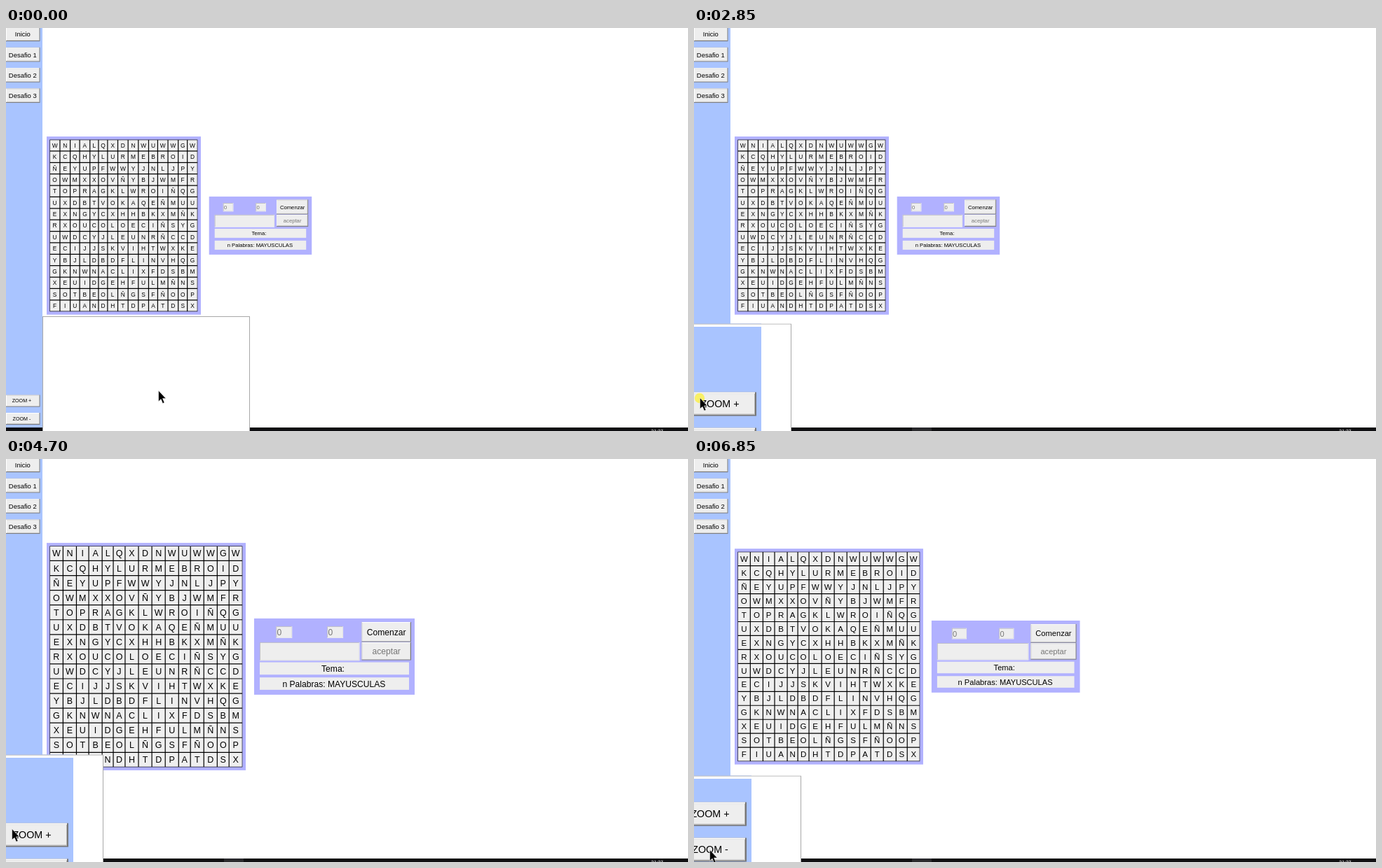
An HTML page for the animation above (8240 ms loop, 973x576 px).

```html
<!DOCTYPE html>
<html lang="es">
<head>
<meta charset="utf-8">
<title>Sopa de letras</title>
<style>
@property --x { syntax: '<number>'; inherits: true; initial-value: 217; }
@property --y { syntax: '<number>'; inherits: true; initial-value: 518; }
html, body { margin: 0; width: 100%; height: 100%; overflow: hidden; background: #fff; }
svg { display: block; width: 973px; height: 576px; font-family: 'Liberation Sans', Arial, sans-serif; }
text { fill: #000; white-space: pre; }
.mid { text-anchor: middle; }
.dim { fill: #777; }
.pointer { transform: translate(calc(var(--x) * 1px), calc(var(--y) * 1px)); }
.zoomed { transform: translate(calc(var(--x) * -2px), calc(var(--y) * -2px)) scale(2); }
</style>
</head>
<body>
<svg id="stage" viewBox="0 0 973 576" xmlns="http://www.w3.org/2000/svg"></svg>
<script>
const LOOP = 8240, STEP = 68.4, MIDDLE = 282.4;
const ROWS = ('WNIALQXDNWUWWGW KCQHYLURMEBROID ÑEYUPFWWYJNLJPY OWMXXOVÑYBJWMFR TOPRAGKLWROIÑQG ' +
  'UXDBTVOKAQEÑMUU EXNGYCXHHBKXMÑK RXOUCOLOECIÑSYG UWDCYJLEUNRÑCCD ECIJJSKVIHTWXKE ' +
  'YBJLDBDFLINVHQG GKNWNACLIXFDSBM XEUIDGEHFULMÑNS SOTBEOLÑGSFÑOOP FIUANDHTDPATDSX').split(' ');
// widest letter of each column sets its share of the grid width
const COLS = 'WWMWNOWWWWOWWOW';
const SHARE = { W: .0694, M: .064, N: .0578, O: .0614 };

// growth of the grid and of the control panel at each zoom level
const LEVELS = [[0, 0], [.27, .39], [.765, .79], [1, 1]];
const CLICKS = [[2850, 3110], [3650, 3970], [4430, 4700], [6510, 6850]];
// pointer legs: start, number of jumps, position reached
const PATH = [
  [740, 13, 22, 512.5], [1630, 2, 14.5, 512.5], [1770, 5, 8, 526],
  [2510, 3, 8, 528.5], [5630, 4, 18.5, 552.5], [5910, 4, 22, 558.5]
];

const mix = (a, b, t) => a + (b - a) * t;
const rect = (x, y, w, h, fill, more = '') =>
  `<rect x="${x}" y="${y}" width="${w}" height="${h}" fill="${fill}" ${more}/>`;
const text = (s, x, cy, size, cls = 'mid') =>
  `<text class="${cls}" x="${x}" y="${cy + size * .36}" font-size="${size}">${s}</text>`;
const group = (cls, body) => `<g class="${cls}">${body}</g>`;

function bevel(x, y, w, h, down) {
  const light = down ? '#777' : '#fff', dark = down ? '#fff' : '#777';
  return rect(x, y, w, h, dark) + rect(x, y, w - 1, h - 1, light) +
    rect(x + 1, y + 1, w - 2, h - 2, down ? '#eee' : '#b4b4b4') +
    rect(x + 1, y + 1, w - 2.5, h - 2.5, '#eee');
}

function sunken(x, y, w, h) {
  return rect(x, y, w, h, '#f8f8f8') + rect(x, y, w - .7, h - .7, '#b4b4c0') +
    rect(x + .8, y + .8, w - 1.5, h - 1.5, '#eee');
}

function zoomButton(sign, down) {
  const y = sign === '+' ? 524.5 : 550, shift = down ? .5 : 0;
  return bevel(0, y, 48.5, 17, down) + text('ZOOM ' + sign, 22.5 + shift, y + 8.4 + shift, 7.15);
}

function sidebar() {
  const labels = ['Inicio', 'Desafio 1', 'Desafio 2', 'Desafio 3'];
  return rect(0, 0, 52, 571, '#a9c4ff') +
    labels.map((s, i) => bevel(0, i * 29.3 - 1.5, 48.5, 20.5) + text(s, 23.8, i * 29.3 + 8.8, 9.45)).join('') +
    zoomButton('+') + zoomButton('-');
}

function board(grow) {
  const half = mix(127.3, 162.5, grow), right = mix(278, 342, grow);
  const left = 62.3, width = right - 4.7 - left;
  const top = MIDDLE - half + 4.5, rowH = (half * 2 - 9) / 15;
  let x = left, cells = '', letters = '';
  [...COLS].forEach((c, i) => {
    const w = SHARE[c] * width;
    ROWS.forEach((row, j) => {
      const y = top + j * rowH;
      cells += `M${x + .6} ${y + .6}h${w - 1.2}v${rowH - 1.2}h${1.2 - w}z`;
      letters += text(row[i], x + w / 2, y + rowH / 2, mix(8.4, 12.5, grow));
    });
    x += w;
  });
  return rect(58, MIDDLE - half, right - 58, half * 2, '#b1b1ff') +
    rect(left, top, x - left, rowH * 15, '#000') + `<path fill="#efefef" d="${cells}"/>` + letters;
}

function controls(grow, wide) {
  const left = mix(289.7, 354, grow), width = mix(146.5, 229, wide), height = mix(83, 109, grow);
  const font = mix(7.7, 12.1, mix(grow, wide, .5));
  const x = left + 8, full = width - 16, line = mix(13, 17.7, grow);
  // rows are stacked upwards from the bottom edge
  const words = MIDDLE + height / 2 - 7 - line, theme = words - 4 - line;
  const acceptH = mix(17, 25.5, grow), accept = theme - 3 - acceptH;
  const startH = mix(21, 28.5, grow), start = accept - .5 - startH;
  const buttonW = width * .308, button = left + width - 5 - buttonW;
  const count = at => {
    const cx = left + width * at, cy = start + startH / 2 + .3;
    return sunken(cx, cy - line * .47, width * .1, line * .94) + text('0', cx + 1.2, cy, font, 'dim');
  };
  return rect(left, MIDDLE - height / 2, width, height, '#b1b1ff') + count(.137) + count(.455) +
    bevel(button, start, buttonW, startH) + text('Comenzar', button + buttonW / 2, start + startH / 2, font) +
    bevel(button, accept, buttonW, acceptH) +
    text('aceptar', button + buttonW / 2, accept + acceptH / 2, font, 'mid dim') +
    sunken(x, accept, button - 3 - x, acceptH + .8) +
    rect(x, theme, full, line, '#eee') + text('Tema:', x + full / 2 - 2, theme + line / 2, font) +
    rect(x, words, full, line, '#eee') +
    text('n Palabras: MAYUSCULAS', x + full / 2 - .6, words + line / 2 + .2, font);
}

const taskbar = rect(0, 571, 973, 5, '#0e0e11') + rect(311, 571, 28, 5, '#29292c') +
  '<text class="mid" x="929" y="579.3" font-size="7" style="fill:#fff">21:27</text>';

const lens = '<clipPath id="glass"><rect x="-165" y="-106" width="296" height="300"/></clipPath>' +
  '<g clip-path="url(#glass)">' + rect(-165, -106, 296, 300, '#fff') +
  group('zoomed', sidebar() + group('press-in', zoomButton('+', true)) +
    group('press-out', zoomButton('-', true))) +
  rect(-162.5, -103.5, 291, 300, 'none', 'stroke="#fff" stroke-width="4"') +
  rect(-164.5, -105.5, 295, 304, 'none', 'stroke="#a8a8a8"') + '</g>';

const cursor = '<circle class="click" cy=".5" r="7.2" fill="#fbf044" opacity=".8"/>' +
  '<path d="M.6 .3v15.5l3.5-3.3 2.5 6 2.4-1-2.5-5.9h4.6z" stroke="#fff" stroke-width=".5"/>';

document.getElementById('stage').innerHTML = rect(0, 0, 973, 576, '#fff') + taskbar + sidebar() +
  LEVELS.map(([grow, wide], i) => group('level' + i, board(grow) + controls(grow, wide))).join('') +
  group('pointer', lens + cursor);

// timing
const pct = ms => (Math.max(0, ms - .5) / LOOP * 100).toFixed(4) + '%';
let css = '';

function show(name, spans) {
  const frames = spans.map(([on, off]) =>
    `${pct(on)}{visibility:visible}` + (off < LOOP ? `${pct(off)}{visibility:hidden}` : ''));
  const first = spans[0][0] ? '0%{visibility:hidden}' : '';
  css += `@keyframes ${name}{${first}${frames.join('')}}` +
    `.${name}{visibility:hidden;animation:${name} ${LOOP}ms step-end infinite}`;
}

let spot = '--x:217;--y:518', frames = `0%{${spot}}`;
for (const [start, jumps, x, y] of PATH) {
  frames += `${pct(start)}{${spot};animation-timing-function:steps(${jumps},jump-start)}`;
  spot = `--x:${x};--y:${y}`;
  frames += `${pct(start + jumps * STEP)}{${spot}}`;
}
css += `@keyframes go{${frames}100%{${spot}}}.pointer{animation:go ${LOOP}ms linear infinite}`;

// the button goes down early in a click, the page zooms halfway through
const [a, b, c, d] = CLICKS.map(([on, off]) => (on + off) / 2);
const presses = CLICKS.map(([on, off]) => [mix(on, off, .2), mix(on, off, .5)]);
show('level0', [[0, a]]);
show('level1', [[a, b]]);
show('level2', [[b, c], [d, LOOP]]);
show('level3', [[c, d]]);
show('press-in', presses.slice(0, 3));
show('press-out', presses.slice(3));
show('click', CLICKS);

const style = document.createElement('style');
style.textContent = css;
document.head.append(style);
</script>
</body>
</html>
```
